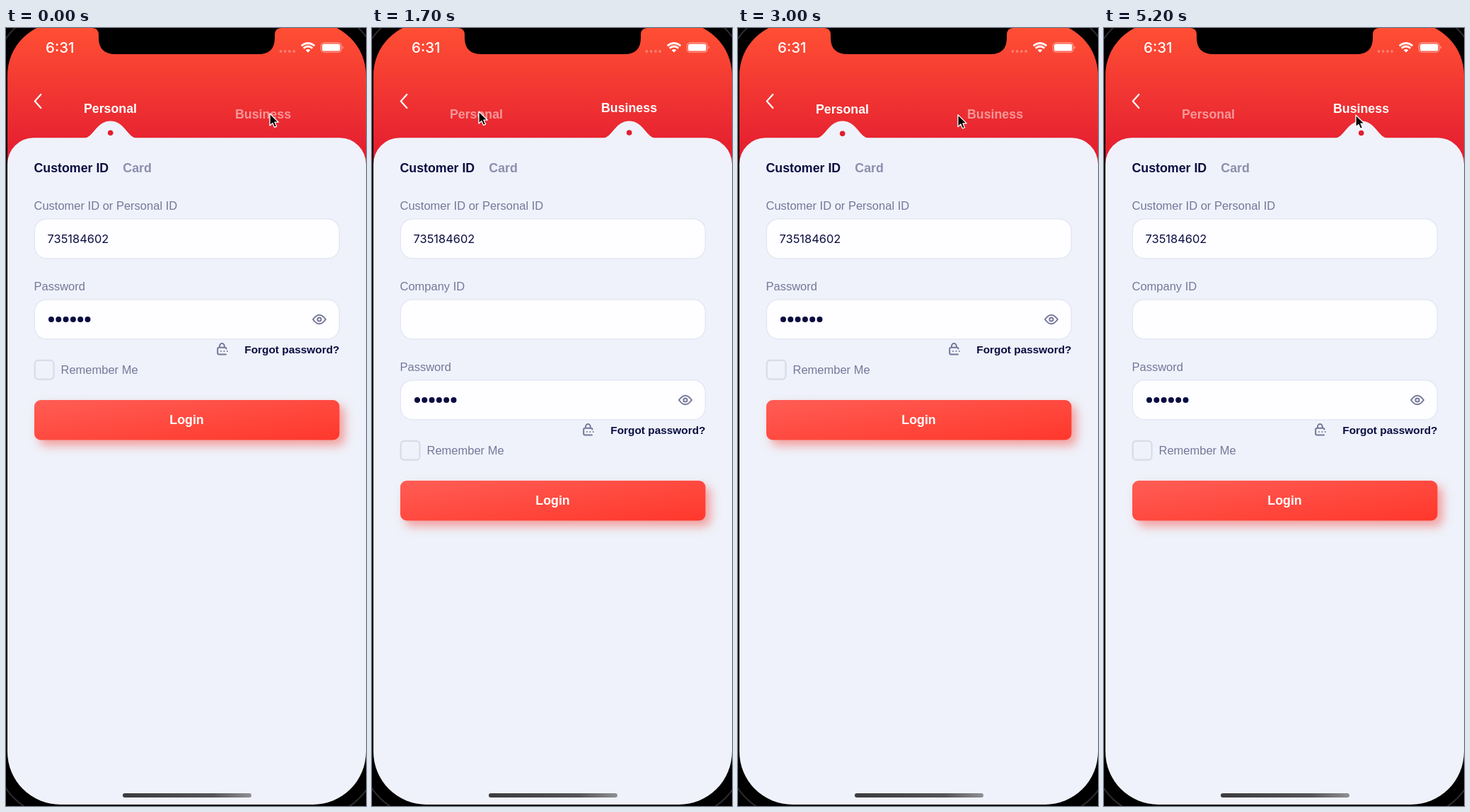
An HTML page for the animation above (5.3 s loop, 509 px wide and 1100 px high).

```html
<!DOCTYPE html>
<html lang="en">
<head>
<meta charset="utf-8">
<title>Login tabs</title>
<style>
  html, body { margin: 0; width: 100%; height: 100%; overflow: hidden; background: #000; }
  svg { display: block; width: 509px; height: 1100px; font: 16.5px "Liberation Sans", Arial, sans-serif; fill: #75779a; }
  .bold { font-weight: bold; font-size: 17.8px; }
  .navy { fill: #0b0d42; }
  .white { fill: #fff; }
  .ui { font-family: Inter, sans-serif; }
  .mid { text-anchor: middle; }
  .field { fill: #fefdff; stroke: #dfe5f4; stroke-width: 1.2; }
  .line { fill: none; stroke: #75779a; stroke-width: 2; stroke-linecap: round; stroke-linejoin: round; }
  .sheet { fill: #eff2fa; }
  .button { fill: url(#button); filter: drop-shadow(7px 8px 7px rgba(245, 75, 65, .5)); }
</style>
</head>
<body>
<svg viewBox="0 0 509 1100">
  <defs>
    <linearGradient id="header" gradientUnits="userSpaceOnUse" x1="0" y1="0" x2="0" y2="185">
      <stop stop-color="#ff4f34"/><stop offset="1" stop-color="#e31c30"/>
    </linearGradient>
    <linearGradient id="button" x2="1" y2="1">
      <stop stop-color="#ff5d55"/><stop offset="1" stop-color="#ff372b"/>
    </linearGradient>
    <linearGradient id="home">
      <stop stop-color="#3c3c3e"/><stop offset=".7" stop-color="#555558"/><stop offset="1" stop-color="#909094"/>
    </linearGradient>
    <clipPath id="screen"><rect x="2" y="-8" width="507" height="1106" rx="75"/></clipPath>
    <path id="bump" d="M-38 156C-24 155.5-20 131.5 0 131.5S24 155.5 38 156Z"/>
  </defs>

  <rect width="509" height="1100" fill="#000"/>
  <rect x="-16" y="-26" width="543" height="1142" rx="93" fill="none" stroke="#2b2b31" stroke-width="2"/>

  <g clip-path="url(#screen)">
    <rect width="509" height="230" fill="url(#header)"/>
    <g class="sheet">
      <use id="bump0" href="#bump"/>
      <use id="bump1" href="#bump"/>
      <rect x="2" y="155.3" width="507" height="1000" rx="37"/>
    </g>
    <path d="M122 0Q131 0 131 10V14Q131 37 155 37H357Q380 37 380 14V10Q380 0 389 0Z" fill="#000"/>

    <text class="white ui" x="56" y="35" font-size="20.5" font-weight="500">6:31</text>
    <g class="white">
      <g opacity=".3">
        <circle cx="388.5" cy="33" r="1.9"/><circle cx="394.7" cy="33" r="1.9"/>
        <circle cx="400.9" cy="33" r="1.9"/><circle cx="407.1" cy="33" r="1.9"/>
      </g>
      <path d="M427 34.8L423.7 31.3Q427 28.7 430.3 31.3Z"/>
      <g fill="none" stroke="#fff" stroke-width="2.7">
        <path d="M420.7 28.6Q427 23.4 433.3 28.6M417.7 25.3Q427 17.7 436.3 25.3"/>
      </g>
      <rect x="445.3" y="20.8" width="28.8" height="13.4" rx="4" fill="none" stroke="#fff" stroke-opacity=".55"/>
      <rect x="447" y="22.5" width="25.4" height="10" rx="2.6"/>
      <path d="M475.6 25.3Q478.4 27.5 475.6 29.7Z" opacity=".55"/>
    </g>

    <path d="M49.3 94L40.8 103.5L49.3 113" fill="none" stroke="#fff" stroke-width="2.2" stroke-linecap="round" stroke-linejoin="round"/>
    <text id="tab0" class="bold white mid" x="147.5">Personal</text>
    <text id="tab1" class="bold white mid" x="363.5">Business</text>
    <circle id="dot" r="3.8" fill="#e21d2f"/>

    <text class="bold navy" x="39.5" y="204.3">Customer ID</text>
    <text class="bold" x="165.3" y="204.3" fill="#8d8eae">Card</text>
    <text x="39.5" y="256.5">Customer ID or Personal ID</text>
    <rect class="field" x="40.3" y="269.8" width="431" height="56" rx="17"/>
    <text class="navy ui" x="58.5" y="304" font-size="16.4">735184602</text>

    <g id="company">
      <text x="39.5" y="370.5">Company ID</text>
      <rect class="field" x="40.3" y="383.8" width="431" height="56" rx="17"/>
    </g>

    <g id="lower">
      <text x="39.5" y="370.5">Password</text>
      <rect class="field" x="40.3" y="383.8" width="431" height="56" rx="17"/>
      <path d="M64 412H116" stroke="#0b0d42" stroke-width="8" stroke-linecap="round" stroke-dasharray="0 10.3"/>
      <path class="line" d="M434 412Q443 399.5 452 412Q443 424.5 434 412Z"/>
      <circle class="line" cx="443" cy="412" r="2.6"/>

      <path class="line" d="M302 451.5V449.5A3.4 3.4 0 0 1 308.8 449.5V451.5M311.5 453.5Q311.5 451.7 309.7 451.7H301.2Q299.2 451.7 299.2 453.7V459.5Q299.2 461.5 301.2 461.5H311"/>
      <path class="line" d="M304 457H313" stroke-dasharray="0 4.4"/>
      <text class="bold navy" x="471.5" y="459.7" text-anchor="end" style="font-size:15.4px">Forgot password?</text>

      <rect x="40.7" y="469.8" width="26.8" height="26.8" rx="5" fill="none" stroke="#d9dbe8" stroke-width="2.2"/>
      <text x="77.5" y="489.2">Remember Me</text>
      <rect class="button" x="40" y="526" width="431.5" height="56.5" rx="9"/>
      <text class="bold white mid" x="255.5" y="560">Login</text>
    </g>

    <rect x="165" y="1082" width="182" height="6" rx="3" fill="url(#home)"/>
  </g>

  <path id="cursor" d="M0 0V17L4 13.4L6.6 19.4L9.6 18.1L7 12.2H12.3Z" fill="#000" stroke="#fff" stroke-width="1.3" stroke-linejoin="round"/>
</svg>

<script>
const LOOP = 5300, LIFT = 8, BUMP_HEIGHT = 25;
const tabX = [147.7, 363.7];
// [time, selected tab]
const clicks = [[-5000, 0], [260, 1], [1910, 0], [3310, 1]];
// [time, x, y]
const pointer = [
  [0, 373, 121], [450, 373, 121], [900, 194, 114], [1500, 151, 118], [2550, 151, 118],
  [3200, 357, 124], [3500, 357, 124], [4200, 354, 121], [4900, 354, 121], [5200, 356, 123], [LOOP, 356, 123]
];

const $ = id => document.getElementById(id);
const move = (id, x, y) => $(id).setAttribute("transform", `translate(${x} ${y})`);
const mix = (a, b, p) => a + (b - a) * p;
const ramp = (t, start, end) => Math.min(1, Math.max(0, (t - start) / (end - start)));
const smooth = p => p * p * (3 - 2 * p);
const cubic = p => p < .5 ? 4 * p ** 3 : 1 - 4 * (1 - p) ** 3;
const spring = ms => {
  const s = Math.max(0, ms) / 1000;
  return 1 - Math.exp(-2.5 * s) * Math.cos(8 * s);
};

function drawTabs(t) {
  const [start, to] = clicks.findLast(([time]) => time <= t);
  const from = 1 - to, age = t - start;
  const rise = spring(age - 400);
  const fall = smooth(ramp(age, 90, 340));

  move("tab" + to, 0, 127.5 - LIFT * rise);
  move("tab" + from, 0, 127.5 - LIFT * (1 - fall));
  $("tab" + to).setAttribute("opacity", 1);
  $("tab" + from).setAttribute("opacity", .5);

  move("bump" + to, tabX[to], BUMP_HEIGHT * (1 - smooth(ramp(age, 240, 530))));
  move("bump" + from, tabX[from], BUMP_HEIGHT * fall);

  const sink = smooth(ramp(age, 0, 250));
  move("dot", mix(tabX[from], tabX[to], cubic(ramp(age, 0, 500))),
    148.3 + LIFT * (age < 400 ? sink : 1 - rise));

  $("company").setAttribute("visibility", to ? "visible" : "hidden");
  move("lower", 0, to * 114);
}

function drawCursor(t) {
  const i = pointer.findLastIndex(([time]) => time <= t);
  const [t0, x0, y0] = pointer[i], [t1, x1, y1] = pointer[i + 1];
  const p = smooth(ramp(t, t0, t1));
  move("cursor", mix(x0, x1, p), mix(y0, y1, p));
}

function frame() {
  const t = performance.now() % LOOP;
  drawTabs(t);
  drawCursor(t);
  requestAnimationFrame(frame);
}
frame();
</script>
</body>
</html>
```
